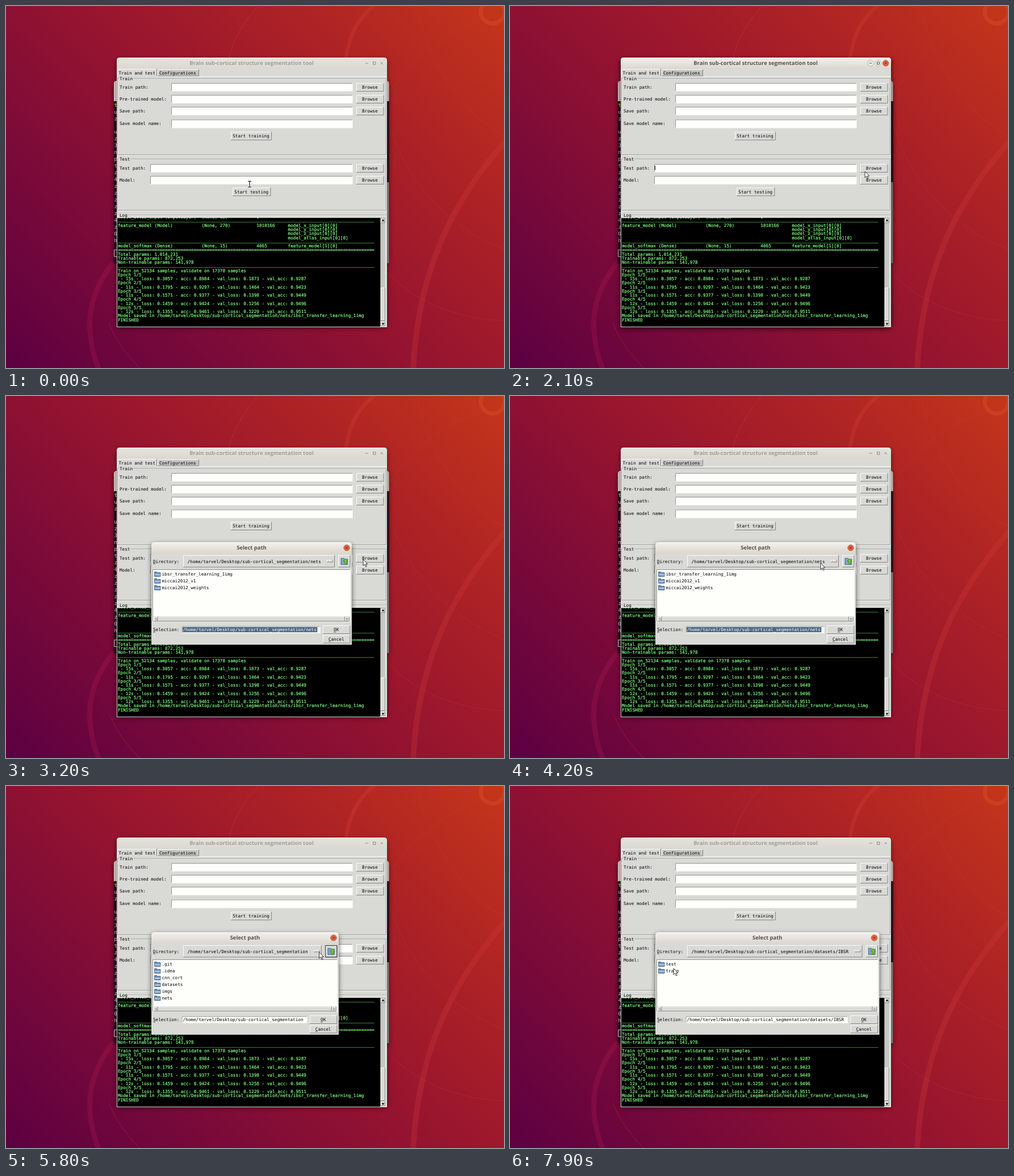
Recreate the animation shown at these times as an HTML page. Size 877 by 639 pixels, loop 8 s.

```html
<!DOCTYPE html>
<html lang="en">
<head>
<meta charset="utf-8">
<title>Segmentation tool</title>
<style>
html, body { margin: 0; width: 100%; height: 100%; overflow: hidden; background: #97152e; }
svg { display: block; width: 877px; height: 639px; }
text { font: 7.67px "DejaVu Sans Mono", monospace; white-space: pre; text-rendering: geometricPrecision; }
.title { font: bold 9.45px "Open Sans", "Noto Sans", sans-serif; text-anchor: middle; }
.mid { text-anchor: middle; }
.log text { fill: #7dfa7d; stroke: #7dfa7d; stroke-width: .22; }
.term text { fill: #e6dfe4; font-size: 9px; }
</style>
</head>
<body>
<svg id="stage" viewBox="0 0 877 639" xmlns="http://www.w3.org/2000/svg"></svg>
<script>
const stage = document.getElementById('stage');
const LOOP = 8000, STEP = 100, CHAR = 4.615;
const FACE = '#d9d9d6', LIGHT = '#fbfbf9', DARK = '#858582';
const USER = 'tarvel';
const ROOT = `/home/${USER}/Desktop/sub-cortical_segmentation`;

// Drawing helpers; text is placed by its vertical centre
const rect = (x, y, w, h, fill, extra = '') =>
  `<rect x="${x}" y="${y}" width="${w}" height="${h}" fill="${fill}" ${extra}/>`;
const path = (d, stroke, width = 1, extra = 'fill="none"') =>
  `<path d="${d}" stroke="${stroke}" stroke-width="${width}" ${extra}/>`;
const text = (x, y, s, extra = '') => `<text x="${x}" y="${y + 2.7}" ${extra}>${s}</text>`;

function bevel(x, y, w, h, fill, top, bottom) {
  return rect(x, y, w, h, fill) +
    path(`M${x + .5} ${y + h}V${y + .5}H${x + w}`, top) +
    path(`M${x} ${y + h - .5}H${x + w - .5}V${y}`, bottom);
}
const raised = (x, y, w, h, fill = FACE) => bevel(x, y, w, h, fill, LIGHT, DARK);
const sunken = (x, y, w, h, fill = '#fefefb') => bevel(x, y, w, h, fill, '#929290', '#f4f4f2');
const button = (x, y, w, h, s) => raised(x, y, w, h) + text(x + w / 2 - .5, y + h / 2, s, 'class="mid"');
const underline = (x, y) => path(`M${x} ${y + 4.2}h4.2`, '#222', .7);

function group(y, bottom, name) {
  const box = o => `M${196.5 + o} ${y + o}H${669.5 + o}V${bottom + o}H${196.5 + o}Z`;
  return path(box(.8), LIGHT, .8) + path(box(0), '#8d8d8a', .8) +
    rect(199, y - 3, name.length * CHAR + 2, 7, FACE) + text(200, y, name);
}

function frame(x, y, w, h, fill) {
  const r = x + w;
  return `<path d="M${x} ${y + h}V${y + 5}q0 -5 5 -5H${r - 5}q5 0 5 5V${y + h}Z" fill="${fill}"/>` +
    path(`M${x + 5} ${y + .7}H${r - 5}`, '#fff', .8, 'fill="none" opacity=".7"');
}
const shadow = (x, y, w, h, o) =>
  rect(x, y + 2, w, h, '#000', `rx="5" opacity="${o}" filter="url(#soft)"`);

function closeButton(x, y) {
  return `<circle cx="${x}" cy="${y}" r="5.3" fill="#e2613f" stroke="#a8553f" stroke-width=".7"/>` +
    path(`M${x - 1.8} ${y - 1.8}l3.6 3.6m0 -3.6l-3.6 3.6`, '#6d2a18', 1);
}

const defs = `<defs>
  <linearGradient id="wall" gradientUnits="userSpaceOnUse" x1="0" y1="639" x2="758" y2="-119">
    <stop offset="0" stop-color="#5c0042"/><stop offset=".25" stop-color="#790a39"/>
    <stop offset=".5" stop-color="#96142f"/><stop offset=".75" stop-color="#ad2225"/>
    <stop offset="1" stop-color="#c4361a"/></linearGradient>
  <linearGradient id="bar" x2="0" y2="1"><stop offset="0" stop-color="#f3f1ee"/>
    <stop offset="1" stop-color="#dad5cc"/></linearGradient>
  <linearGradient id="dull" x2="0" y2="1"><stop offset="0" stop-color="#e6e3de"/>
    <stop offset="1" stop-color="#dad7d0"/></linearGradient>
  <filter id="soft" x="-10%" y="-10%" width="120%" height="120%"><feGaussianBlur stdDeviation="4"/></filter>
  <clipPath id="logClip"><rect x="196" y="374" width="463" height="192"/></clipPath>
</defs>`;

function wallpaper() {
  const arc = (d, c, w, o) => path(d, c, w, `fill="none" opacity="${o}"`);
  const hair = (d, o = .25) => arc(d, '#d84040', 1, o);
  return rect(0, 0, 877, 639, 'url(#wall)') +
    arc('M652 -4C618 22 602 56 598 100', '#d8453a', 7, .25) +
    arc('M190 452C158 490 144 536 148 575Q151 612 164 642', '#b01a50', 9, .28) +
    arc('M880 238C800 330 726 450 717 642', '#d03a3a', 10, .28) +
    '<circle cx="857" cy="10" r="21" fill="none" stroke="#d8502c" stroke-width="7" opacity=".4"/>' +
    hair('M393 92C400 56 424 22 446 -2', .4) + hair('M671 190C690 290 770 390 880 430') +
    hair('M671 160C720 80 800 30 880 12') + hair('M724 0C735 80 800 190 880 232') +
    hair('M671 470C730 530 800 552 880 556') + hair('M181 560Q200 605 238 642', .3);
}

function terminal() {
  const rows = 'tuz uz3nptz4zzzzz4z0h';
  let s = shadow(190, 133, 484, 321, .45) + frame(190, 132, 484.5, 36, '#d5d0c8') +
    rect(190, 168, 484.5, 286.5, '#2c0a22') + rect(671, 311, 3.5, 143, '#8d8986');
  [...rows].forEach((c, i) => {
    s += text(190.5, 175 + i * 11.94, c, i ? '' : 'style="fill:#7fe030;font-weight:bold"');
  });
  return `<g class="term">${s}${path('M190.8 430.5H197V442.5H190.8Z', '#e6dfe4')}</g>`;
}

function logView() {
  const row = (a, b, c, d) => a.padEnd(32) + b.padEnd(21) + c.padEnd(12) + d;
  const rule = '_'.repeat(98);
  const lines = [
    row('model_atlas_input (InputLayer)', '(None, 15)', '0', ''), rule,
    row('feature_model (Model)', '(None, 270)', '1010166', 'model_x_input[0][0]'),
    ...['y', 'z', 'atlas'].map(axis => row('', '', '', `model_${axis}_input[0][0]`)), rule,
    row('model_softmax (Dense)', '(None, 15)', '4065', 'feature_model[1][0]'), '='.repeat(98),
    'Total params: 1,014,231', 'Trainable params: 872,253', 'Non-trainable params: 141,978', rule,
    'Train on 52134 samples, validate on 17378 samples',
    'Epoch 1/5', ' - 15s - loss: 0.3057 - acc: 0.8984 - val_loss: 0.1873 - val_acc: 0.9287',
    'Epoch 2/5', ' - 11s - loss: 0.1795 - acc: 0.9297 - val_loss: 0.1464 - val_acc: 0.9423',
    'Epoch 3/5', ' - 11s - loss: 0.1571 - acc: 0.9377 - val_loss: 0.1398 - val_acc: 0.9449',
    'Epoch 4/5', ' - 12s - loss: 0.1459 - acc: 0.9424 - val_loss: 0.1256 - val_acc: 0.9496',
    'Epoch 5/5', ' - 12s - loss: 0.1355 - acc: 0.9461 - val_loss: 0.1229 - val_acc: 0.9511',
    `Model saved in ${ROOT}/nets/ibsr_transfer_learning_1img`, 'FINISHED'
  ];
  return rect(196, 374, 463, 192, '#000') +
    `<g class="log" clip-path="url(#logClip)">${lines.map((s, i) =>
      text(197, 372.5 + i * 7.26 - (s === rule ? 2.2 : 0), s)).join('')}</g>` +
    sunken(659, 374, 10, 192, '#c6c6c3') + raised(660, 375, 8, 8) + raised(660, 497, 8, 59) +
    raised(660, 557, 8, 8) +
    '<path d="M661.5 380h5l-2.5 -4zM661.5 559.5h5l-2.5 4z" fill="#222"/>';
}

function mainWindow() {
  const title = color =>
    text(432.5, 101.5, 'Brain sub-cortical structure segmentation tool', `class="title" fill="${color}"`);
  const field = (name, y, x) => text(200, y, name) + sunken(x, y - 7, 610.5 - x, 15);
  const browse = y => button(617, y - 7, 48.5, 15, 'Browse');
  return shadow(195, 92, 476, 474, .5) +
    `<g id="glow" opacity="0">${shadow(194, 92, 478, 476, .3)}</g>` +
    frame(195, 91, 476, 21, 'url(#dull)') + title('#a39d96') +
    path('M632.5 101h5M646.5 98.8h4.4v4.4h-4.4zM659.8 99.2l3.6 3.6m0 -3.6l-3.6 3.6', '#8d8880', 1) +
    `<g id="lit" opacity="0">${frame(195, 91, 476, 21, 'url(#bar)')}${title('#5a514b')}
      <g fill="#ebe8e3" stroke="#a9a39b" stroke-width=".7"><circle cx="635" cy="101" r="5.3"/><circle cx="648.5" cy="101" r="5.3"/></g>
      ${path('M632.8 101h4.4M646.6 99h3.9v3.9h-3.9z', '#5a544e', 1)}${closeButton(661.6, 101)}</g>` +
    rect(195, 111, 476, 456, FACE) +
    raised(267, 112, 73, 12, '#c3c3c0') + raised(196, 111, 70, 14) +
    rect(196, 124, 474, 1, LIGHT) + rect(197, 124, 68, 1.5, FACE) +
    text(198.5, 118, 'Train and test') + text(270, 118, 'Configurations') +
    group(128, 262.5, 'Train') + group(270, 360.5, 'Test') +
    path('M196 369H670', '#8d8d8a', .8) + path('M196 370H670', LIGHT, .8) +
    rect(199, 366, 16, 7, FACE) + text(200, 369, 'Log') +
    field('Train path:', 143, 291) + field('Pre-trained model:', 164, 291) +
    field('Save path:', 185, 291) + field('Save model name:', 207.5, 291) +
    field('Test path:', 286, 254) + field('Model:', 307, 254) +
    [143, 164, 185, 286, 307].map(browse).join('') +
    button(396, 222, 72, 15, 'Start training') + button(399, 320.5, 67.5, 15, 'Start testing') +
    rect(255, 282, 1, 7.5, '#111', 'id="caret" opacity="0"') + logView();
}

const folder = (x, y) =>
  `<path d="M${x} ${y - 4}h4l1 1.3h5.5v6.7h-10.5z" fill="#5f86b4" stroke="#3c5878" stroke-width=".8"/>` +
  rect(x + .6, y - 1, 9.4, 3.6, '#9fbfe0');

// The dialog grows with its path
const rightEdge = view => 373.6 + (ROOT + view.dir).length * CHAR;

function dialog(view) {
  const full = ROOT + view.dir, R = rightEdge(view), x = 256, w = R - x;
  let s = shadow(x, 259, w, 179, .6) + frame(x, 258, w, 21, 'url(#bar)') +
    text((x + R) / 2, 268.5, 'Select path', 'class="title" fill="#5a514b"') + closeButton(R - 9, 268) +
    rect(x, 278, w, 161, FACE) +
    text(259, 292, 'Directory:') + underline(259, 292) +
    raised(312, 281, R - 30 - 312, 21.5) + text(319.5, 292, full) +
    raised(R - 44, 289.5, 11, 4) + raised(R - 24, 281, 21.5, 21.5) +
    (view.ring ? path(`M${R - 23.5} 281.5h20.5v20.5h-20.5z`, '#333') : '') +
    `<path d="M${R - 19} 286.5h5l1 1.5h5.5v9.5h-11.5z" fill="#7fa3cc" stroke="#3c5878" stroke-width=".8"/>` +
    `<path d="M${R - 11} 287l4.2 4.6h-2.4v5h-3.6v-5h-2.4z" fill="#74c42c" stroke="#3f8a14" stroke-width=".7"/>` +
    sunken(258, 306, w - 4, 93) +
    bevel(260, 389, w - 8, 9.5, '#c8c8c5', '#a0a09d', LIGHT) +
    raised(260, 389.5, 8, 8.5) + raised(R - 12, 389.5, 8, 8.5) + raised(268, 389.5, w - 24, 8.5) +
    path(`M265.5 391.5l-3 2.3l3 2.3zM${R - 9.5} 391.5l3 2.3l-3 2.3z`, '#888', .7) +
    text(259, 412.5, 'Selection:') + underline(259, 412.5) +
    sunken(309.5, 406.5, R - 55.5 - 309.5, 12) +
    (view.selected ? rect(311, 408, full.length * CHAR + 2, 9, '#4a6984') : '') +
    text(311.5, 412.5, full, view.selected ? 'fill="#fff"' : '') +
    button(R - 51, 405, 48.5, 15, 'OK') + underline(R - 32, 412.5) +
    button(R - 51, 421.5, 48.5, 15, 'Cancel') + underline(R - 41, 429);
  view.items.forEach((name, i) => {
    s += folder(261.5, 314.5 + i * 12) + text(274.5, 314 + i * 12, name);
  });
  return s;
}

const beam = 'M-3 -5.2H-.8L0 -4.4L.8 -5.2H3M0 -4.4V4.4M-3 5.2H-.8L0 4.4L.8 5.2H3';
stage.innerHTML = defs + wallpaper() + terminal() + mainWindow() + '<g id="dialog"></g>' +
  `<g id="arrow"><path d="M0 0V11L2.6 8.7L4.4 12.8L6.2 12L4.4 8.1H7.8Z" fill="#fff" stroke="#222" stroke-width=".9"/></g>
   <g id="beam">${path(beam, '#fff', 2.6)}${path(beam, '#222', 1.2)}</g>`;
const el = id => document.getElementById(id);

// Pointer strokes: from, to, and where each one ends
const strokes = [
  [200, 700, 390, 288], [1300, 1400, 409, 288], [1500, 1800, 576, 284], [2000, 2100, 625, 292],
  [2600, 2900, 629, 288.5], [3300, 3400, 521, 290.5], [3500, 3700, 470, 304], [3800, 4500, 597, 289],
  [5000, 5600, 572, 289], [5700, 6300, 296, 347.5], [6700, 7200, 288, 313.5], [7600, 7900, 288, 322]
];
const views = [
  { from: 3100, dir: '/nets', selected: true, items: ['ibsr_transfer_learning_1img', 'miccai2012_v1', 'miccai2012_weights'] },
  { from: 4700, dir: '', ring: true, items: ['.git', '.idea', 'cnn_cort', 'datasets', 'imgs', 'nets'] },
  { from: 6500, dir: '/datasets', items: ['IBSR', 'MICCAI2012'] },
  { from: 7500, dir: '/datasets/IBSR', items: ['test', 'train'] }
];

const ramp = (t, a, b) => Math.min(1, Math.max(0, (t - a) / (b - a)));
const ease = u => u * u * (3 - 2 * u);

function pointer(t) {
  let x = 429, y = 314.5;
  for (const [from, to, endX, endY] of strokes) {
    const u = ease(ramp(t, from, to));
    x += (endX - x) * u;
    y += (endY - y) * u;
  }
  return [x, y];
}

// The text pointer shows over the two test fields where the dialog leaves them free
function overField(x, y, view) {
  const row = Math.min(Math.abs(y - 286.5), Math.abs(y - 307.5));
  return row <= 7.5 && x > (view ? rightEdge(view) : 254) && x < 610;
}

let shown;
function draw(time) {
  const t = Math.floor(time / STEP) * STEP;
  const view = views.findLast(v => v.from <= t);
  const [x, y] = pointer(t);
  const shape = overField(x, y, view) ? 'beam' : 'arrow';
  for (const id of ['arrow', 'beam']) {
    el(id).setAttribute('transform', `translate(${x} ${y})`);
    el(id).setAttribute('visibility', id === shape ? 'visible' : 'hidden');
  }
  const opened = ramp(t, 3000, 3200), lit = ramp(t, 800, 1000) - opened;
  el('lit').setAttribute('opacity', lit);
  el('glow').setAttribute('opacity', lit);
  el('caret').setAttribute('opacity', t >= 1000 && t < 3000 && (t - 1000) % 800 < 600 ? 1 : 0);
  el('dialog').setAttribute('opacity', opened);
  if (view !== shown) {
    shown = view;
    el('dialog').innerHTML = view ? dialog(view) : '';
  }
}

const start = performance.now();
function tick() {
  draw((performance.now() - start) % LOOP);
  requestAnimationFrame(tick);
}
tick();
</script>
</body>
</html>
```
